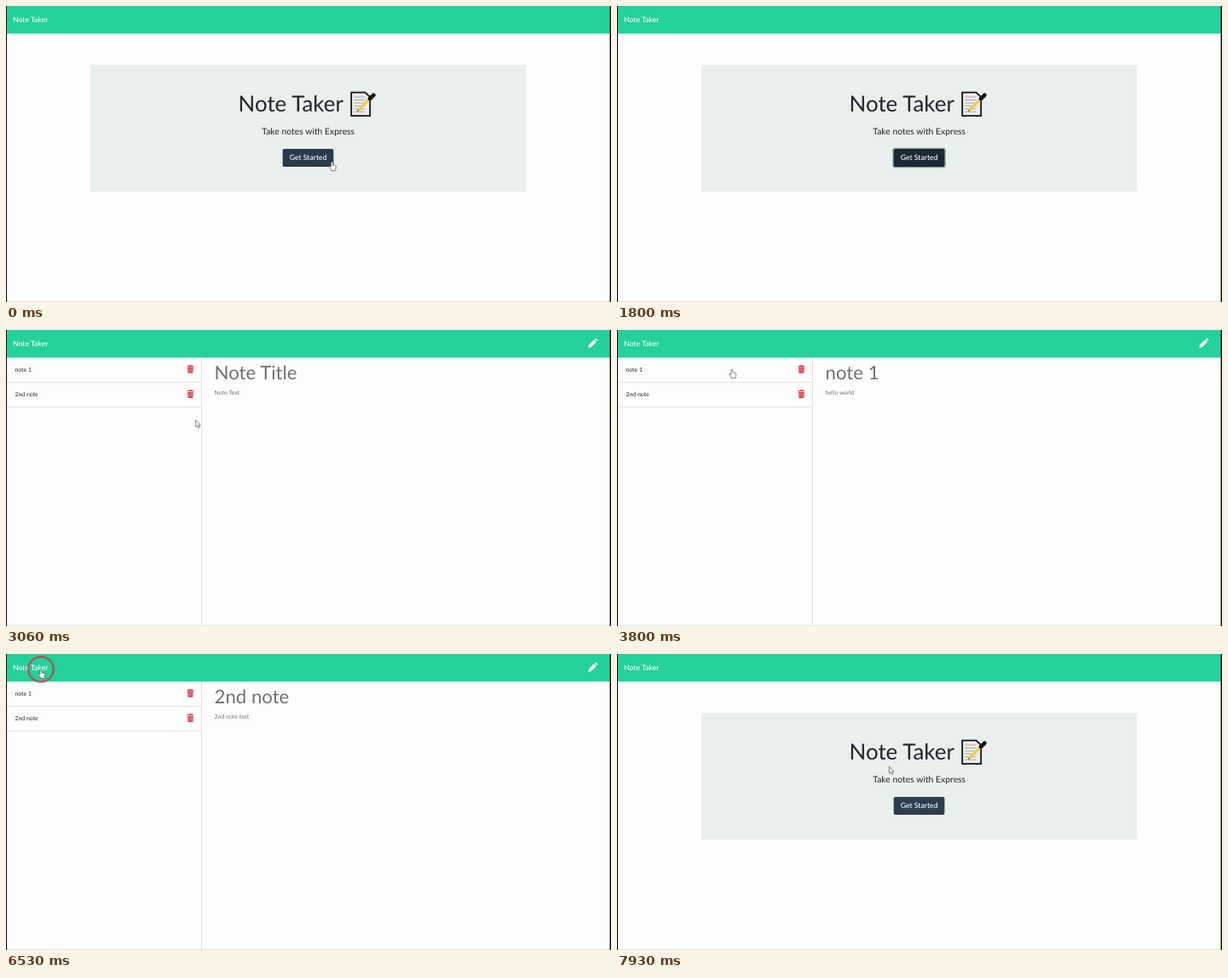
These frames come from a looping animation (710x348 px, 8 s). An HTML page:

```html
<!DOCTYPE html>
<html lang="en">
<head>
<meta charset="utf-8">
<title>Note Taker</title>
<style>
  html, body { margin: 0; width: 100%; height: 100%; overflow: hidden; background: #fdfdfd; }
  svg { display: block; width: 710px; height: 348px; font: 6.93px Lato, sans-serif; text-rendering: geometricPrecision; }
  .light { font-size: 8.67px; font-weight: 500; fill: #fff; }
  .dark { fill: #212529; }
  .field { fill: #717171; }
  .rule { stroke: #e2e2e2; fill: none; }
  .mid { text-anchor: middle; }
  .cursor { fill: #fff; stroke: #555; stroke-width: .7; stroke-linejoin: round; }
</style>
</head>
<body>
<svg viewBox="0 0 710 348">
  <defs>
    <g id="trash">
      <path d="M0 1H2.5V.2H5.5V1H8V2H0ZM.6 2.6H7.4L7 9.8H1Z" fill="#dc3c4b"/>
      <path d="M2 6.2H6" stroke="#f3b4ba" stroke-width="4.8" stroke-dasharray=".6 1.1"/>
    </g>
  </defs>
  <rect width="710" height="32.5" fill="#24d19a"/>
  <text class="light" x="8" y="19.1">Note Taker</text>

  <g id="home">
    <rect x="99" y="69.3" width="511.3" height="149" fill="#e8efed"/>
    <text class="dark" x="272.6" y="123.8" font-size="25.9">Note Taker</text>
    <path d="M405.2 101.7H421.5L427.2 107.2V129.2H405.2Z" fill="#ececec" stroke="#111" stroke-width="1.8"/>
    <path d="M414.8 106.5V125.5" stroke="#aaa" stroke-width="13" stroke-dasharray=".9 2.6"/>
    <g stroke-width="3.2">
      <path d="M413.5 122.5L427 109" stroke="#f0cd50"/>
      <path d="M427 109L431.5 104.8" stroke="#111" stroke-width="4.6" stroke-linecap="round"/>
      <path d="M412 124L414 122" stroke="#8a7440" stroke-width="1.6"/>
    </g>
    <text class="dark mid" x="354.7" y="150.6" font-size="10.4">Take notes with Express</text>
    <rect id="focus" x="323.4" y="166.7" width="62.3" height="23.6" rx="3" fill="#8d9aa2"/>
    <rect id="button" x="324.7" y="168" width="59.7" height="21" rx="2"/>
    <text class="light mid" x="354.6" y="181.4">Get Started</text>
  </g>

  <g id="notes">
    <path class="rule" d="M1 61.5H229M1 90.5H229M229.5 32.5V347.5"/>
    <text class="dark" x="10.4" y="49.3">note 1</text>
    <text class="dark" x="10.4" y="78.4">2nd note</text>
    <use href="#trash" x="212.4" y="41"/>
    <use href="#trash" x="212.4" y="70.1"/>
    <path d="M683.2 21L683.9 17.6L690.2 11.3L692.9 14L686.6 20.3ZM690.9 10.6L692.2 9.6L694.5 12L693.5 13.3Z" fill="#fff"/>
    <text id="title" class="field" x="244.6" y="57.9" font-size="22.2"></text>
    <text id="body" class="field" x="244.6" y="75.9"></text>
  </g>

  <path class="rule" d="M0 347.5H710"/>
  <path d="M0 0H1V348H0ZM708.6 0H710V348H708.6Z"/>
  <g id="pointer">
    <circle id="ring" r="14.8" fill="none" stroke="#dc2840" stroke-opacity=".7" stroke-width="2.4"/>
    <path id="arrow" class="cursor" d="M0 0V8L1.8 6.4L3.1 9.2L4.4 8.6L3.1 5.9H5.6Z"/>
    <path id="hand" class="cursor" d="M-1 .8Q0 -.4 1 .8V4L4.2 4.7Q5 5 4.9 6L4.3 8.3V10.6H-.8V9.2L-3.4 6.4Q-3.4 5 -2.2 5.4L-1 6.4Z"/>
  </g>
</svg>
<script>
const $ = id => document.getElementById(id);
const show = (id, on) => $(id).style.display = on ? '' : 'none';
const within = (t, a, b) => t >= a && t < b;
const ease = p => p * p * (3 - 2 * p);
const LOOP = 8000, PRESS = 1725, OPEN = 1860, BACK = 7860;

// Pointer moves: from time, to time, x, y; it rests in between
const start = [382.5, 183];
const moves = [
  [60, 330, 374, 180],
  [730, 1060, 367, 184],
  [1200, 1260, 365, 182],
  [1730, 2130, 222, 73],
  [2730, 2860, 222.6, 106],
  [3060, 3400, 135, 46],
  [4260, 4460, 129, 77],
  [5130, 5730, 88, 46],
  [5800, 6330, 41, 18],
  [6660, 7460, 155.3, 44],
  [7800, 7930, 319.5, 132.3]
];
const clicks = [3460, 4930, 6440];
const pages = [['Note Title', 'Note Text'], ['note 1', 'hello world'], ['2nd note', '2nd note test']];

function pointer(t) {
  let [x, y] = start;
  for (const [from, to, toX, toY] of moves) {
    const k = ease(Math.min(1, Math.max(0, (t - from) / (to - from))));
    x += (toX - x) * k;
    y += (toY - y) * k;
  }
  return [x, y];
}

function draw(now) {
  const t = now % LOOP;
  const home = !within(t, OPEN, BACK);
  const pressed = within(t, PRESS, OPEN);
  const [x, y] = pointer(t);
  const link = home
    ? within(x, 325, 384) && within(y, 168, 189)
    : y > 32 ? x < 229 && y < 90 : x < 50;
  const visible = !within(t, PRESS, 2125);
  // Each of the first two clicks opens the next note
  const page = clicks.slice(0, 2).filter(c => t >= c + 120).length;

  show('home', home);
  show('notes', !home);
  show('focus', pressed);
  show('pointer', visible);
  show('hand', link);
  show('arrow', !link);
  show('ring', clicks.some(c => within(t, c, c + 180)));
  $('button').setAttribute('fill', pressed ? '#1a2a35' : link ? '#293a4a' : '#2c3e50');
  $('pointer').setAttribute('transform', `translate(${x} ${y})`);
  [$('title').textContent, $('body').textContent] = pages[page];
}

function tick(now) {
  draw(now);
  requestAnimationFrame(tick);
}
draw(0);
requestAnimationFrame(tick);
</script>
</body>
</html>
```
